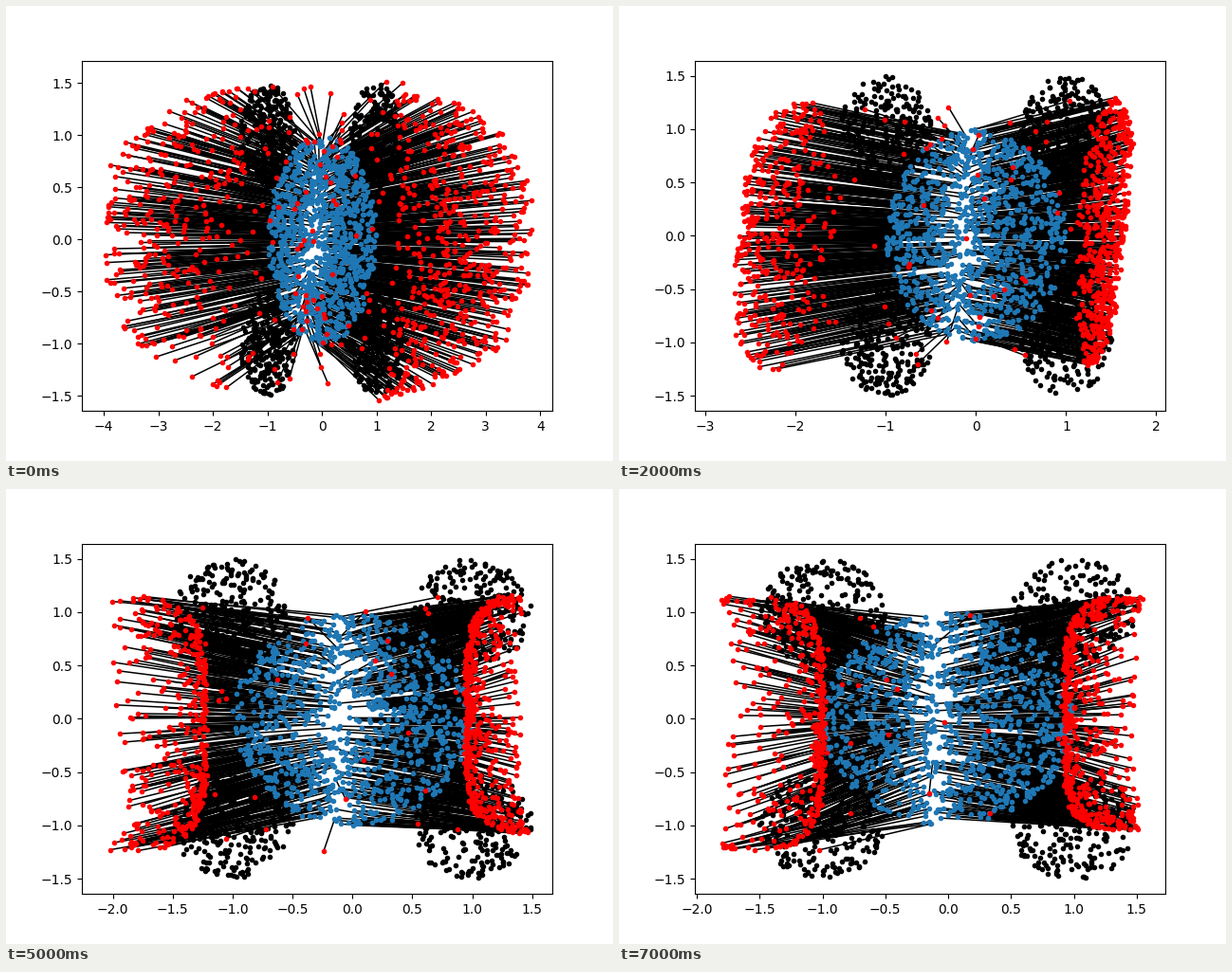
Recreate the animation shown at these times as a matplotlib script. Size 640 by 480 pixels, loop 8 s.

```python
import numpy as np
import matplotlib.pyplot as plt
from matplotlib.animation import FuncAnimation
from matplotlib.collections import LineCollection

COUNT = 1000
STEPS = 8

# Farthest data point to the left and right at every step
REACH_LEFT = [4.01, 3.30, 2.88, 2.56, 2.28, 2.08, 2.317, 1.845]
REACH_RIGHT = [3.83, 2.436, 1.863, 1.571, 1.495, 1.49, 1.605, 1.558]


def lerp(a, b, k):
    return a + (b - a) * k


def disc(rng, n, radius=1.0):
    r = radius * np.sqrt(rng.random(n))
    a = 2 * np.pi * rng.random(n)
    return np.column_stack([r * np.cos(a), r * np.sin(a)])


def top_height(step):
    return 1.12 + 0.44 * np.exp(-step / 2)


def push(points, step):
    """Carry the disc to both sides of a split line.

    Each half is stretched between a near and a far edge. The far edge
    starts as an ellipse, leans over, then opens towards the corners.
    """
    x, y = points.T
    t = step / (STEPS - 1)
    decay = np.exp(-step / 2)
    spread = min(step / 3, 1)
    lean = 0.35 * np.sin(2 * np.pi * t ** 2)

    split = -0.17 + 0.05 * t + 0.18 * decay * y
    u = x - split
    side = np.where(u < 0, -1, 1)
    edge = np.sqrt(np.maximum(1 - y ** 2, 0)) - side * split
    depth = np.clip(np.abs(u) / np.maximum(edge, 0.05), 0, 1)

    # Points leave the near edge late, except around the corners
    late = 1 / (1 + np.exp(-4 * (step - 4)))
    power = lerp(0.8 - 0.5 * spread, 4, late)
    power = lerp(power, min(power, 1), y ** 2)

    reach = np.where(u < 0, REACH_LEFT[step], REACH_RIGHT[step]) - abs(lean)
    middle = reach * (1 - 0.04 * spread)
    far = side * lerp(middle, lerp(1, reach, spread), y ** 4) + lean * y
    near = side * np.where(u < 0, 1 + 0.3 * np.sin(np.pi * t), 1 - 0.07 * t)
    near = lerp(near, far, 0.7 * spread * y ** 4)
    goal = lerp(near, far, depth ** power)

    ramp = np.clip(np.abs(u) / (0.016 + 0.064 * decay), 0, 1)
    height = top_height(step) - np.where(y < 0, 0.1 * side * spread, 0)
    rise = y + 0.5 * t * (y - y ** 3)
    return np.column_stack([lerp(split, goal, ramp), rise * height])


def padded(low, high):
    pad = 0.05 * (high - low)
    return low - pad, high + pad


fig, ax = plt.subplots(figsize=(6.4, 4.8), dpi=100)
goals, = ax.plot([], [], ".", color="black", zorder=1)
links = LineCollection([], colors="black", linewidths=1.1, zorder=2)
ax.add_collection(links)
starts, = ax.plot([], [], ".", color="C0", zorder=3)
ends, = ax.plot([], [], ".", color="red", zorder=4)


def draw(step):
    rng = np.random.default_rng(40 + step)
    corners = rng.choice([-1, 1], (COUNT, 2))
    target = corners + disc(rng, COUNT, 0.5)
    source = disc(rng, COUNT)
    moved = push(source, step) + rng.normal(0, 0.012, (COUNT, 2))

    goals.set_data(*target.T)
    starts.set_data(*source.T)
    ends.set_data(*moved.T)
    links.set_segments(np.stack([source, moved], axis=1))
    ax.set_xlim(padded(-REACH_LEFT[step], REACH_RIGHT[step]))
    ax.set_ylim(padded(-1.493, max(1.493, top_height(step))))
    return goals, links, starts, ends


anim = FuncAnimation(fig, draw, frames=STEPS, interval=1000,
                     init_func=lambda: draw(0), repeat=True, repeat_delay=0)
plt.show()
```
